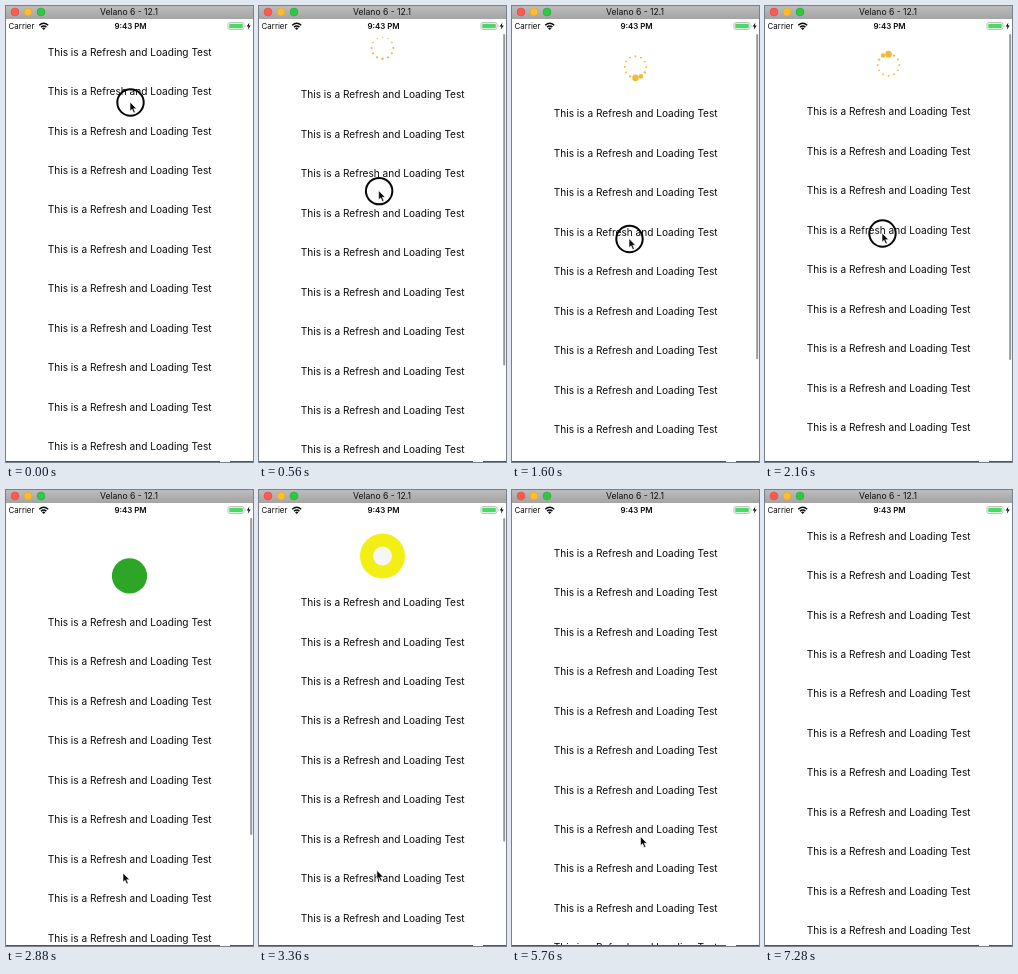
Write an HTML page that moves like this. It is 247 by 456 pixels and loops after 7.36 s.

```html
<!DOCTYPE html>
<html lang="en">
<head>
<meta charset="utf-8">
<title>Pull to refresh</title>
<style>
  html, body { margin: 0; width: 100%; height: 100%; overflow: hidden; background: #fff; }
  svg { display: block; width: 247px; height: 456px; font-family: Inter, "Liberation Sans", sans-serif; fill: #0a0a0a; }
  .row { font-size: 10.1px; text-anchor: middle; }
  .mid { text-anchor: middle; }
</style>
</head>
<body>
<svg viewBox="0 0 247 456">
  <defs>
    <linearGradient id="bar" x2="0" y2="1">
      <stop stop-color="#bcbcbc"/>
      <stop offset="1" stop-color="#a4a4a4"/>
    </linearGradient>
  </defs>
  <rect width="247" height="456" fill="#fff"/>
  <g id="content">
    <g id="dots" fill="#f4b83c"></g>
    <circle id="disc" cx="123.5" cy="-.5"/>
    <circle id="hole" cx="123.5" cy="-.5" fill="#f6f6f6"/>
    <g id="rows"></g>
  </g>
  <rect id="scroll" x="244.2" y="28" width="2" rx="1" fill="#989898"/>

  <rect y="13" width="247" height="13" fill="#fff"/>
  <rect width="247" height="13" fill="url(#bar)"/>
  <g stroke-width=".5">
    <circle cx="9" cy="6" r="4" fill="#fc5b53" stroke="#dd473f"/>
    <circle cx="22" cy="6" r="4" fill="#fdbc34" stroke="#dc9e27"/>
    <circle cx="35" cy="6" r="4" fill="#30c744" stroke="#24a735"/>
  </g>
  <text class="mid" x="123" y="9.3" font-size="8.6" fill="#111">Velano 6 - 12.1</text>

  <text x="2.6" y="23" font-size="7.9">Carrier</text>
  <path d="M33.2 19.2Q37.7 15.2 42.2 19.2M35 21.1Q37.7 18.8 40.4 21.1" fill="none" stroke="#0a0a0a" stroke-width="1.5"/>
  <path d="M36 22.2Q37.7 21 39.4 22.2L37.7 24Z"/>
  <text class="mid" x="124.5" y="23" font-size="7.9" font-weight="600">9:43 PM</text>
  <rect x="222" y="16.5" width="16" height="7" rx="2" fill="none" stroke="#a5a5a5" stroke-width=".7"/>
  <rect x="223.2" y="17.7" width="13.6" height="4.6" rx="1" fill="#4bd864"/>
  <path d="M239 18.8Q240.1 20 239 21.2Z" fill="#a5a5a5"/>
  <path d="M243.4 16.5L240.7 20.6H242.5L241.8 23.8L244.7 19.4H242.8Z"/>
  <path d="M0 455.5H214M224 455.5H247" stroke="#555"/>

  <g id="pointer">
    <circle id="touch" cx=".5" cy=".5" r="13.2" fill="none" stroke="#080808" stroke-width="2"/>
    <path d="M0 0V9.2L2.1 7.3L3.7 11L5.3 10.3L3.7 6.7H6.6Z" stroke="#fff" stroke-width=".6"/>
  </g>
</svg>
<script>
const LOOP = 7360, STEP = 80;
const RELEASE = 2720, REST = 66.5;
const DOTS = 12, RING = 10.8;
const $ = id => document.getElementById(id);

// Progress from 0 to 1 between two times
const ramp = (t, a, b) => Math.min(1, Math.max(0, (t - a) / (b - a)));
const smooth = (t, a, b) => { const x = ramp(t, a, b); return x * x * (3 - 2 * x); };
const easeOut = (t, a, b) => 1 - (1 - ramp(t, a, b)) ** 3;
const mix = (a, b, x) => a + (b - a) * x;
const set = (el, attrs) => { for (const k in attrs) el.setAttribute(k, attrs[k]); };

function add(parent, tag, attrs) {
  const el = document.createElementNS("http://www.w3.org/2000/svg", tag);
  set(el, attrs);
  return parent.appendChild(el);
}

for (let i = 0; i < 11; i++) {
  add($("rows"), "text", { class: "row", x: 123.7, y: 49.6 + i * 39.45 })
    .textContent = "This is a Refresh and Loading Test";
}
const dots = Array.from({ length: DOTS }, (_, i) => {
  const a = i / DOTS * 2 * Math.PI;
  return add($("dots"), "circle", { cx: 123.5 + RING * Math.sin(a), cy: -.8 - RING * Math.cos(a) });
});

// How far the finger has dragged down
const drag = t => 142 * smooth(t, 0, 960) - 11 * smooth(t, 1040, 2160) + 156 * smooth(t, 2160, 2640);

// Rubber-band resistance while held, then settle and close
function pull(t) {
  const x = .55 * drag(t);
  const held = x / (1 + x / 350);
  return mix(held, REST, easeOut(t, RELEASE, 3440)) * (1 - smooth(t, 5440, 5920));
}

// A swelling head runs clockwise with a shrinking tail
function drawDots(t) {
  const head = (t - 2160) / 1120 + 4;
  const wave = ramp(t, 1040, 1360);
  dots.forEach((dot, i) => {
    const turn = i / DOTS;
    const behind = (head - turn) % 1 * DOTS;
    const near = Math.min(behind, (DOTS - behind) * 2);
    const base = .95 - .25 * Math.cos(turn * 2 * Math.PI) * (1 - wave);
    dot.setAttribute("r", base + 2.4 * wave * Math.max(0, 1 - near / 2.2));
  });
}

function drawDisc(t) {
  const x = ramp(t, 2960, 3280);
  const tone = [mix(45, 243, x), mix(166, 238, x), mix(40, 20, x)].map(Math.round);
  set($("disc"), {
    r: 22.5 * easeOut(t, RELEASE, 3120) * (1 - smooth(t, 4480, 5280)),
    fill: `rgb(${tone})`
  });
  $("hole").setAttribute("r", 19 * smooth(t, 3120, 3600) * (1 - smooth(t, 4400, 4880)));
}

function draw(t) {
  const y = pull(t);
  $("content").setAttribute("transform", `translate(0 ${y})`);
  drawDots(t);
  drawDisc(t);
  set($("scroll"), {
    height: 326 - (y - 59.5) * .33,
    opacity: ramp(t, 0, 160) * (1 - ramp(t, 3360, 3680))
  });

  const move = smooth(t, 3280, 3760), leave = smooth(t, 6160, 6880);
  const px = 124 - 7 * smooth(t, 0, 960) + 11.5 * move + 18 * leave;
  const py = 96 + drag(t) - 36.5 * move - 365 * leave;
  $("pointer").setAttribute("transform", `translate(${px} ${py})`);

  const held = t < RELEASE ? "" : "none";
  $("dots").style.display = held;
  $("touch").style.display = held;
}

const start = performance.now();
function tick(now) {
  const t = Math.max(0, now - start) % LOOP;
  draw(Math.floor(t / STEP) * STEP);
  requestAnimationFrame(tick);
}
draw(0);
requestAnimationFrame(tick);
</script>
</body>
</html>
```
